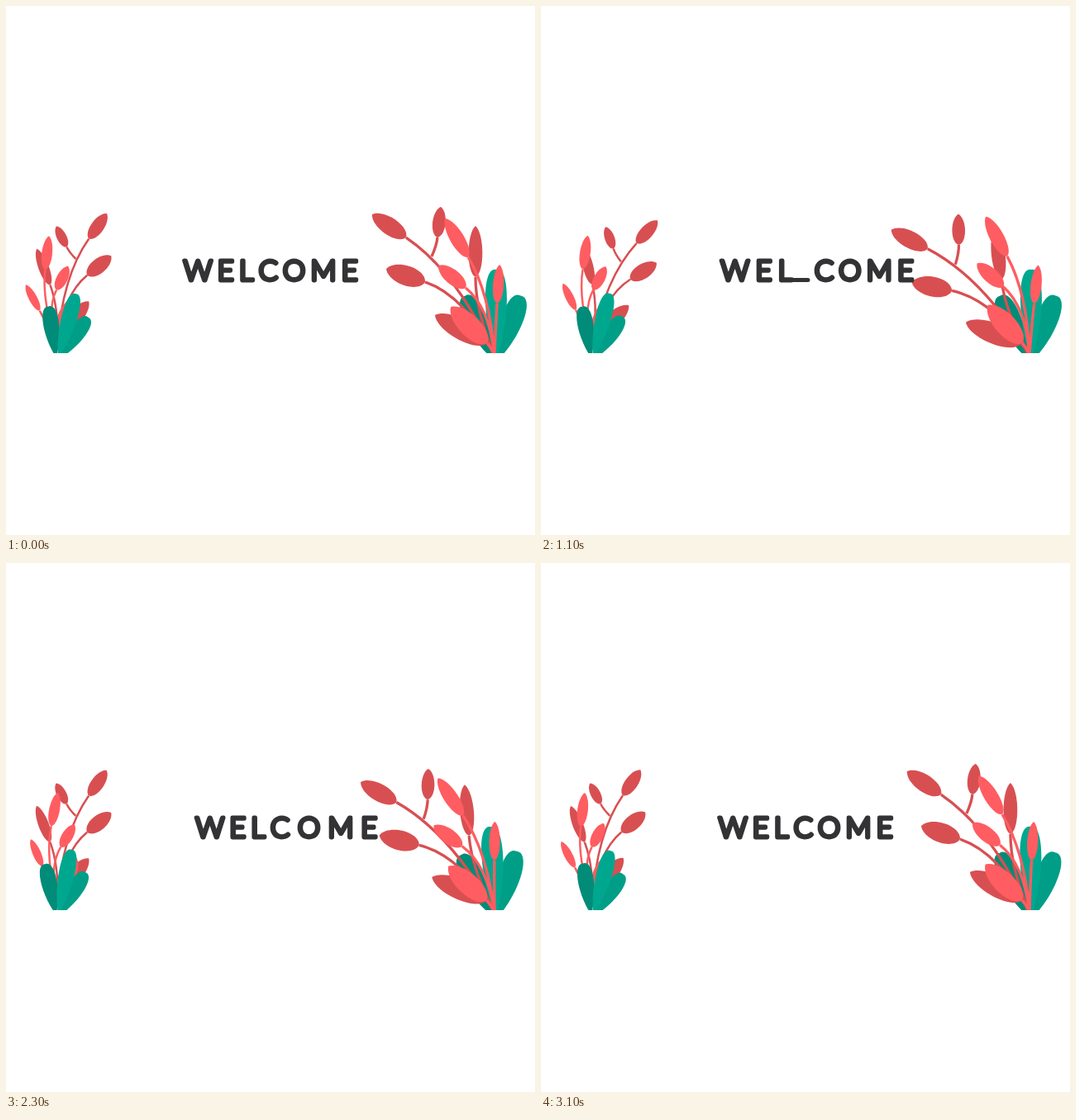
Animation, 640 px wide and 640 px high, one loop 3.2 s. Source, as an HTML page:

```html
<!DOCTYPE html>
<html lang="en">
<head>
<meta charset="utf-8">
<title>Welcome</title>
<style>
  html, body { margin: 0; width: 100%; height: 100%; overflow: hidden; background: #fff; }
  svg { display: block; width: 100%; height: 100%; }
  text, line { stroke: #333336; stroke-linejoin: round; stroke-linecap: round; }
  text { font: 300 34.2px Lato, sans-serif; fill: #333336; stroke-width: 4.8; }
  line { stroke-width: 5; }
</style>
</head>
<body>
<svg viewBox="0 0 640 640">
  <clipPath id="ground"><rect width="640" height="420"/></clipPath>
  <g id="plants" clip-path="url(#ground)"></g>
  <g id="word"></g>
</svg>
<script>
const LOOP = 3200, STEP = 100;
const plants = document.getElementById('plants');
const word = document.getElementById('word');

function add(parent, tag, attributes = {}) {
  const node = document.createElementNS('http://www.w3.org/2000/svg', tag);
  for (const key in attributes) node.setAttribute(key, attributes[key]);
  return parent.appendChild(node);
}

// A leaf from base to tip; near and far place the bulge along its length.
function leaf(parent, fill, base, tip, width, near = 0.08, far = 0.84) {
  const dx = tip[0] - base[0], dy = tip[1] - base[1];
  const height = width / 1.5 / Math.hypot(dx, dy);
  const at = (along, side) =>
    `${base[0] + dx * along - dy * height * side} ${base[1] + dy * along + dx * height * side}`;
  add(parent, 'path', {
    fill,
    d: `M${base}C${at(near, 1)} ${at(far, 1)} ${tip}C${at(far, -1)} ${at(near, -1)} ${base}Z`
  });
}

// A leaf on a stem that leaves its origin and bends into the axis of the leaf.
function sprig(parent, color, base, tip, slimness = 0.42, origin = [3, 3]) {
  const length = Math.hypot(tip[0] - base[0], tip[1] - base[1]);
  const reach = 0.42 * Math.hypot(base[0] - origin[0], base[1] - origin[1]);
  const bend = base.map((value, i) => value - (tip[i] - value) / length * reach);
  add(parent, 'path', {
    d: `M${origin}Q${bend} ${base}`, fill: 'none', stroke: color, 'stroke-width': 3.3
  });
  leaf(parent, color, base, tip, length * slimness);
}

// Groups sway about their own root, leaning furthest clockwise at peak ms.
const swaying = [];
function sway(parent, lean, degrees, peak) {
  const node = add(parent, 'g');
  swaying.push({ node, lean, degrees, peak });
  return node;
}

function flowers(transform, lead) {
  const plant = add(plants, 'g', { transform });

  const dark = sway(plant, -4.35, 4.35, -30 - lead);
  const red = (...shape) => sprig(dark, '#d84f52', ...shape);
  red([-104, -140], [-145, -168]);
  red([-66, -140], [-62, -177], 0.42, [-73, -117]);
  red([-81, -86], [-128, -102], 0.48);
  red([-20, -92], [-20, -154], 0.27);
  red([-6, -12], [-69, -46], 0.35);

  const bright = sway(plant, 0, 3.05, 780 - lead);
  const coral = (...shape) => sprig(bright, '#ff5d61', ...shape);
  coral([-29, -116], [-57, -163], 0.31);
  coral([-32, -79], [-65, -106]);
  coral([6, -60], [9, -107], 0.28);
  coral([-6, -12], [-50, -56], 0.41);
}

// Three club-shaped leaves in a fan, the tall middle one in front.
function foliage(transform, peak) {
  const clump = sway(add(plants, 'g', { transform }), -1.2, 2.5, peak);
  const blade = (fill, degrees, length) => {
    const angle = degrees * Math.PI / 180;
    const tip = [length * Math.sin(angle), -length * Math.cos(angle)];
    leaf(clump, fill, [degrees / 8, 0], tip, 26, 0.45, 1.04);
  };
  blade('#008c78', -26, 86);
  blade('#009e87', 21, 83);
  blade('#00a78f', 0, 109);
}

// The left flowers are the right ones mirrored, smaller and more upright.
flowers('translate(63.5 408) rotate(-22) scale(-0.755 0.755)', 425);
foliage('translate(63 426) rotate(15) scale(0.74)', 400);
foliage('translate(593 428)', 550);
flowers('translate(588 420)', 0);

// The first three letters trail behind to the right; the last three trail back.
const TRAVEL = 25.3, DURATION = 700, GAP = 6.3, CENTER = 320.2;
const letters = [...'WELCOME'].map((char, i) => {
  const node = add(word, 'text', { y: 332.2 });
  node.textContent = char;
  return {
    node,
    width: node.getComputedTextLength(),
    out: i < 3 ? 960 - 30 * i : 0,
    back: 1980 + 66 * Math.max(0, i - 3)
  };
});
const total = letters.reduce((sum, letter) => sum + letter.width + GAP, -GAP);
letters.reduce((x, letter) => {
  letter.x = x;
  return x + letter.width + GAP;
}, CENTER - total / 2);
const foot = add(word, 'line', { y1: 331.6, y2: 331.6 });

function ease(time, start) {
  const progress = Math.min(1, Math.max(0, (time - start) / DURATION));
  return (1 - Math.cos(Math.PI * progress)) / 2;
}

function draw(time) {
  for (const { node, lean, degrees, peak } of swaying) {
    const angle = lean + degrees * Math.cos(2 * Math.PI * (time - peak) / LOOP);
    node.setAttribute('transform', `rotate(${angle})`);
  }
  const places = letters.map(({ node, x, out, back }) => {
    const place = x + TRAVEL * (ease(time, out) - ease(time, back));
    node.setAttribute('x', place);
    return place;
  });
  foot.setAttribute('x1', places[2] + 5);
  foot.setAttribute('x2', places[3] - 8);
}

const start = performance.now();
function tick() {
  const elapsed = (performance.now() - start) % LOOP;
  draw(Math.floor(elapsed / STEP) * STEP);
  requestAnimationFrame(tick);
}
tick();
</script>
</body>
</html>
```
